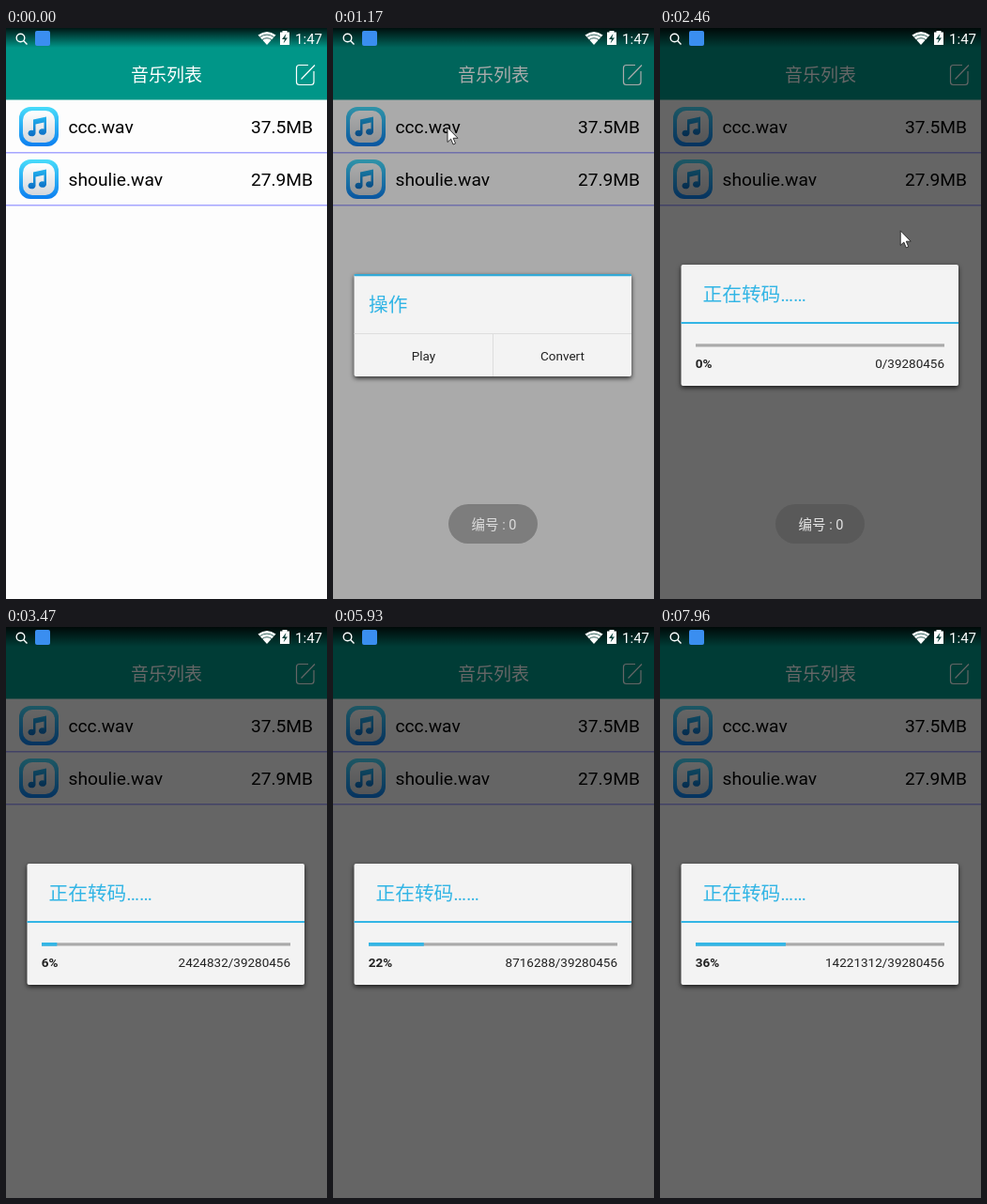
These frames come from a looping animation (342 px wide and 608 px high, 8000 ms). An HTML page:

```html
<!DOCTYPE html>
<html lang="zh-CN">
<head>
<meta charset="utf-8">
<style>
html, body { margin: 0; width: 100%; height: 100%; overflow: hidden; background: #fdfdfd; }
svg { display: block; width: 342px; height: 608px; }
text { font-family: Roboto, "Noto Sans CJK SC", "Noto Sans CJK", sans-serif; }
.row { font-size: 19.2px; fill: #000; }
.small { font-size: 13.5px; fill: #222; }
.big { font-size: 20.7px; fill: #33b5e5; }
.end { text-anchor: end; }
.mid { text-anchor: middle; }
.card { fill: #f3f3f3; filter: drop-shadow(0 2px 2.5px rgba(0,0,0,.75)); }
</style>
</head>
<body>
<svg viewBox="0 0 342 608">
  <defs>
    <linearGradient id="shade" x2="0" y2="1">
      <stop stop-opacity=".85"/><stop offset="1" stop-opacity="0"/>
    </linearGradient>
    <linearGradient id="rim" x2="0" y2="1">
      <stop stop-color="#48dcfa"/><stop offset="1" stop-color="#0c7ff0"/>
    </linearGradient>
    <linearGradient id="face" x2="0" y2="1">
      <stop stop-color="#fff"/><stop offset="1" stop-color="#d4d8dc"/>
    </linearGradient>
    <linearGradient id="note" x2="0" y2="1">
      <stop stop-color="#25b4f0"/><stop offset="1" stop-color="#0a6cc4"/>
    </linearGradient>
    <g id="music">
      <rect width="42" height="42" rx="12" fill="url(#rim)"/>
      <rect x="4" y="4" width="34" height="34" rx="10" fill="url(#face)"/>
      <path fill="url(#note)" d="M15 13.5 29 10.500V26.500A4 3.300 0 1 1 26.500 23.500V16.500L17.500 18.500V28A4 3.300 0 1 1 15 25Z"/>
    </g>
  </defs>

  <!-- file list -->
  <rect width="342" height="608" fill="#fdfdfd"/>
  <rect width="342" height="76.500" fill="#009688"/>
  <text x="171" y="57" class="mid" font-size="19" fill="#fff">音乐列表</text>
  <path d="M322 39.500H312.500Q309.500 39.500 309.500 42.500V57.500Q309.500 60.500 312.500 60.500H325Q328 60.500 328 57.500V46M314.500 54.500 329 39.500" fill="none" stroke="#fff" stroke-width="1.200"/>
  <use href="#music" x="14" y="84"/>
  <text x="66.500" y="112" class="row">ccc.wav</text>
  <text x="327" y="112" class="row end">37.5MB</text>
  <use href="#music" x="14" y="140"/>
  <text x="66.500" y="168" class="row">shoulie.wav</text>
  <text x="327" y="168" class="row end">27.9MB</text>
  <path d="M0 132.800H342M0 188.800H342" stroke="#a6a6ff" stroke-width="1.600"/>

  <rect id="dim" width="342" height="608"/>

  <!-- status bar -->
  <rect width="342" height="21" fill="url(#shade)"/>
  <g fill="none" stroke="#fff" stroke-width="1.400">
    <circle cx="15.500" cy="10.500" r="4.300"/><path d="M18.600 13.600 22.500 17.500"/>
  </g>
  <rect x="31" y="3" width="16" height="16" rx="2" fill="#3a8ef0"/>
  <path d="M278 18 268.500 7.500Q278 .5 287.500 7.500Z" fill="#fff"/>
  <path d="M270.500 9.700Q278 4.500 285.500 9.700M273 12.500Q278 9 283 12.500" fill="none" stroke="#033d37" stroke-width=".8"/>
  <path d="M294.500 3H299.500V4.500H302V18H292V4.500H294.500Z" fill="#fff"/>
  <path d="M298.500 6 294 12H297L295.500 16.500 300 10.500H297.200Z" fill="#053f39"/>
  <text x="337" y="17" class="end" font-size="15" fill="#fff">1:47</text>

  <!-- action dialog -->
  <g id="menu">
    <rect x="22.500" y="262" width="295.500" height="109" rx="2" class="card"/>
    <rect x="22.500" y="262" width="295.500" height="2.300" rx="1" fill="#33a9d6"/>
    <text x="38" y="302.300" class="big">操作</text>
    <path d="M22.500 325.500H318M170.500 325.500V371" stroke="#ddd"/>
    <text x="96.500" y="353.500" class="small mid">Play</text>
    <text x="244.500" y="353.500" class="small mid">Convert</text>
  </g>

  <!-- progress dialog -->
  <g id="job">
    <rect x="22.500" y="252" width="295.500" height="129" rx="2" class="card"/>
    <text x="45.500" y="291.300" class="big">正在转码……</text>
    <rect x="22.500" y="313" width="295.500" height="2" fill="#33b5e5"/>
    <rect x="38" y="336.300" width="265" height="3.200" fill="#aaa"/>
    <rect id="bar" x="38" y="336" width="0" height="3.700" fill="#33b5e5"/>
    <text id="percent" x="37.800" y="361.800" class="small" font-weight="700"></text>
    <text id="count" x="303" y="361.800" class="small end"></text>
  </g>

  <g id="toast">
    <rect x="123" y="507" width="95" height="42" rx="21" fill="#525252" fill-opacity=".6"/>
    <text x="171.500" y="534" class="mid" font-size="14.500" fill="#e6e6e6">编号 : 0</text>
  </g>

  <path id="cursor" d="M0 0V15.500L3.600 12.200 6 18 8.500 17 6.100 11.300H11Z" fill="#fff" stroke="#222" stroke-width=".9"/>
</svg>
<script>
const LOOP = 8000, TOTAL = 39280456, CHUNK = 65536;
const $ = id => document.getElementById(id);

// The screen refreshes in bursts: [first, last, refreshes]
const bursts = [[590, 1600, 8], [1750, 1900, 2], [2180, 3180, 8], [3320, 4230, 8],
  [4380, 5360, 8], [5510, 6460, 8], [6600, 7550, 8], [7700, 7960, 3]];
const ticks = bursts.flatMap(([a, b, n]) =>
  Array.from({ length: n }, (_, i) => a + (b - a) * i / (n - 1)));
const lastTick = t => ticks.reduce((last, k) => k <= t + 12 ? k : last, 0);

// Linear track through [time, value] points
function track(points, t) {
  if (t <= points[0][0]) return points[0][1];
  for (let i = 1; i < points.length; i++) {
    const [a, u] = points[i - 1], [b, v] = points[i];
    if (t <= b) return u + (v - u) * (t - a) / (b - a);
  }
  return points[points.length - 1][1];
}

const dim = [[1024, 0], [1167, .33], [1311, .6]];
const menu = [[1024, 0], [1167, 1], [2100, 1], [2320, 0]];
const job = [[2180, 0], [2460, 1]];
const toast = [[1024, 0], [1167, .85], [1311, 1], [3030, 1], [3440, 0]];
const chunks = [[2480, 0], [3450, 37], [5080, 100], [6871, 171], [7960, 217]];
const cursorX = [[590, 235], [1024, 120], [1167, 122], [1311, 136], [1600, 199], [1750, 224],
  [1900, 232], [2180, 234], [2900, 290]];
const cursorY = [[590, 30], [1024, 107], [1167, 106], [1311, 99], [1600, 303], [1750, 340],
  [1900, 353], [2180, 348], [2900, 15]];

function draw(time) {
  const t = lastTick(time % LOOP);
  const show = (id, points) => $(id).setAttribute("opacity", track(points, t));
  show("dim", dim);
  show("menu", menu);
  show("job", job);
  show("toast", toast);

  const done = Math.round(track(chunks, t)) * CHUNK;
  $("bar").setAttribute("width", 265 * done / TOTAL);
  $("percent").textContent = Math.round(100 * done / TOTAL) + "%";
  $("count").textContent = done + "/" + TOTAL;

  $("cursor").setAttribute("transform", `translate(${track(cursorX, t)} ${track(cursorY, t)})`);
  $("cursor").setAttribute("opacity", t >= 590 && t < 2900 ? 1 : 0);
}

const start = performance.now();
function frame() {
  draw(performance.now() - start);
  requestAnimationFrame(frame);
}
frame();
</script>
</body>
</html>
```
